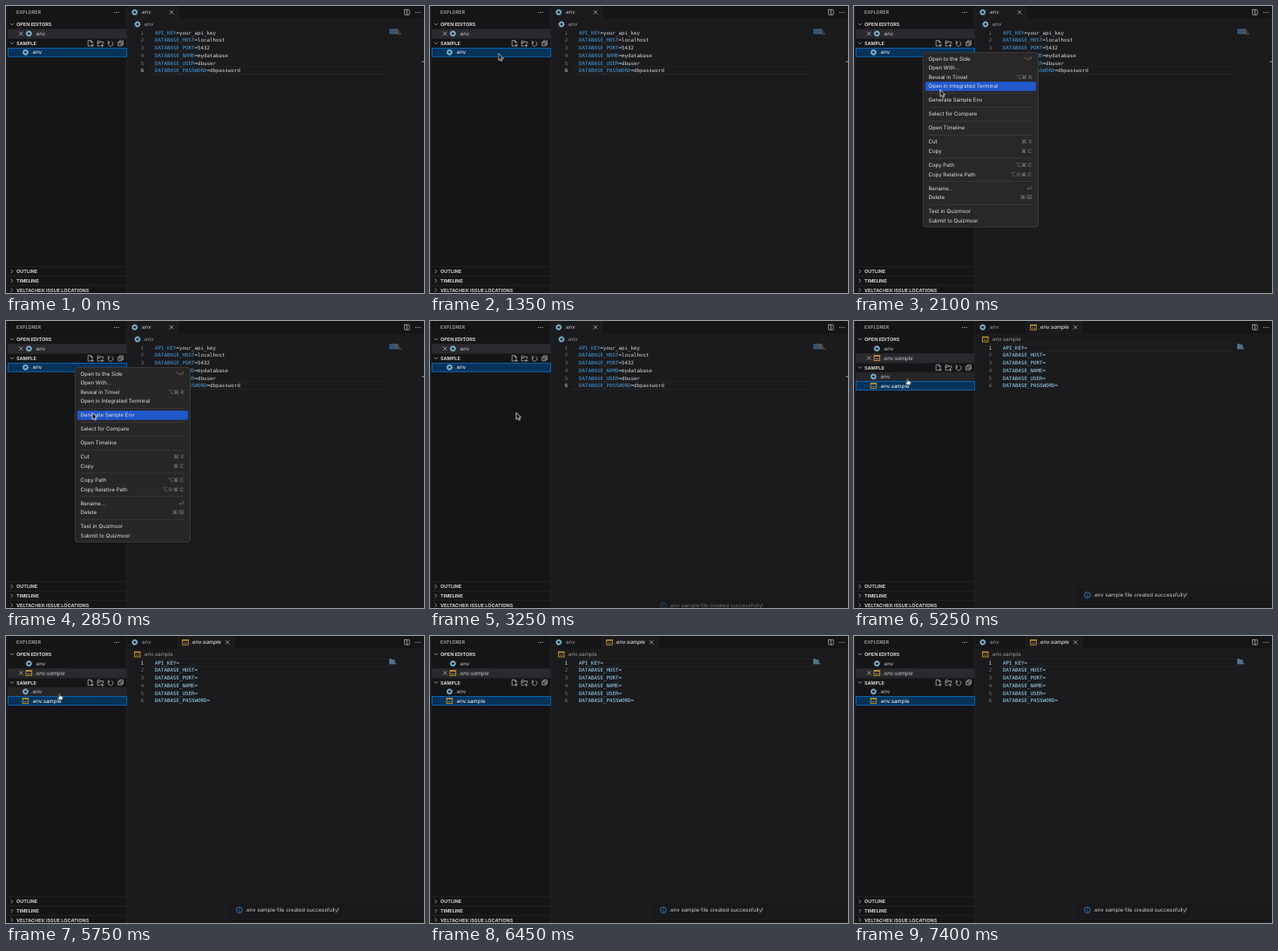
An HTML page that plays this animation: 480x330 px, repeating every 7450 ms.

```html
<!DOCTYPE html>
<html lang="en">
<head>
<meta charset="utf-8">
<title>Sample env generator</title>
<style>
html, body { margin: 0; width: 100%; height: 100%; overflow: hidden; background: #19191b; }
svg { display: block; width: 480px; height: 330px; }
text { font: 6.1px Inter, sans-serif; fill: #ccc; white-space: pre; text-rendering: geometricPrecision; }
.head { font-size: 5.5px; font-weight: 700; fill: #d0d0d0; }
.code, .code tspan { font: 5.82px "DejaVu Sans Mono", monospace; }
.num { fill: #6e7681; text-anchor: end; }
.on { fill: #d4d4d4; }
.key { fill: #459fe5; }
.val { fill: #d8dadd; }
.blank { fill: #9cdcfe; }
.dim { fill: #9b9b9b; }
.it { font-style: italic; }
.short { font-family: Inter, "DejaVu Sans", sans-serif; text-anchor: end; fill: #8b8989; }
.line { fill: none; stroke: #c4c4c4; stroke-width: .7; stroke-linecap: round; stroke-linejoin: round; }
.rule { stroke: #2a2a2c; stroke-width: .7; }

#before, #after, #newFile, #menu, #pick, #toast, #cursor, #arrow, #hand, .hover {
  animation: 7450ms step-end infinite;
}
#before { animation-name: before; }
#after, #hand { animation-name: after; }
#newFile { animation-name: newFile; }
#arrow { animation-name: arrow; }
#hand { animation-name: hand; }
#menu { animation-name: menu; }
#pick { animation-name: pick; }
#hoverNew { animation-name: hoverNew; }
#hoverEnv { animation-name: hoverEnv; }
#toast { animation-name: toast; animation-timing-function: linear; }
#cursor { animation-name: cursor; animation-timing-function: ease-in-out; }

@keyframes before { 0% { opacity: 1 } 66.44%, 100% { opacity: 0 } }
@keyframes after { 0% { opacity: 0 } 66.44%, 100% { opacity: 1 } }
@keyframes newFile { 0% { opacity: 0 } 49.66%, 100% { opacity: 1 } }
@keyframes hoverNew { 0% { opacity: 0 } 61.74% { opacity: 1 } 66.44%, 100% { opacity: 0 } }
@keyframes hoverEnv { 0% { opacity: 0 } 66.44% { opacity: 1 } 78.52%, 100% { opacity: 0 } }
@keyframes arrow { 0% { opacity: 1 } 62.42% { opacity: 0 } 78.52%, 100% { opacity: 1 } }
@keyframes hand { 0% { opacity: 0 } 62.42% { opacity: 1 } 78.52%, 100% { opacity: 0 } }
@keyframes menu {
  0% { opacity: 0 }
  19.46% { opacity: 1 }
  38.26% { opacity: 1; animation-timing-function: linear }
  39.6%, 100% { opacity: 0 }
}
@keyframes pick {
  0% { opacity: 0; transform: translateY(0) }
  23.49% { opacity: 1; transform: translateY(0) }
  25.5% { opacity: 1; transform: translateY(10.7px) }
  26.5% { opacity: 1; transform: translateY(21.3px) }
  27.4% { opacity: 1; transform: translateY(32px) }
  30.87% { opacity: 1; transform: translateY(48px) }
  36.91% { opacity: 0; transform: translateY(48px) }
  37.58%, 100% { opacity: 1; transform: translateY(48px) }
}
@keyframes toast {
  0%, 42.28% { opacity: 0; transform: translateY(24px); animation-timing-function: ease-out }
  46.31%, 100% { opacity: 1; transform: none }
}
@keyframes cursor {
  0%, 2.68% { transform: translate(-12px, 186px) }
  12.08%, 22.82% { transform: translate(78.5px, 54.5px) }
  28.19% { transform: translate(99px, 96.3px) }
  32.21%, 46.98% { transform: translate(99px, 105.2px) }
  57.72%, 59.06% { transform: translate(87.8px, 81.5px) }
  65.1%, 77.85% { transform: translate(61.5px, 66px) }
  84.56%, 100% { transform: translate(490px, 150px) }
}
</style>
</head>
<body>
<svg viewBox="0 0 480 330">
  <defs>
    <g id="gear" fill="none" stroke="#7db9d6">
      <circle r="2.2" stroke-width="1.5"/>
      <circle r="3.2" stroke-width="1" stroke-dasharray="1.25 1.263"/>
    </g>
    <g id="sheet" fill="none" stroke="#c8962e" stroke-width=".9">
      <rect x="-3.3" y="-2.8" width="6.6" height="5.8"/>
      <path d="M-3.3-2.3H3.3" stroke-width="1.3"/>
      <path d="M-1.9 1H2" stroke-dasharray="1 .5" stroke-width="1"/>
    </g>
    <path id="cross" class="line" d="M-1.9-1.9 1.9 1.9M1.9-1.9-1.9 1.9"/>
    <path id="down" class="line" d="M-1.8-.9 0 .9 1.8-.9"/>
    <path id="right" class="line" d="M-.9-1.8.9 0-.9 1.8"/>
    <g id="dots" fill="#c4c4c4"><circle cx="-2.3" r=".6"/><circle r=".6"/><circle cx="2.3" r=".6"/></g>
    <g id="tools" class="line">
      <path d="M96.5 46H94.2V39.7H97.5L99.3 41.5V42.8M97.4 39.8V41.6H99.2M98.9 43.8V47M97.3 45.4H100.5"/>
      <path d="M107.4 46H105.2V40.2H107.6L108.6 41.2H111.8V43.2M105.2 42.4H108L108.8 41.4M110.4 43.9V47.1M108.8 45.5H112"/>
      <path d="M118.2 41.1A2.9 2.9 0 1 0 121.6 40.8M117 40.2 118.5 41.2 118.1 42.9"/>
      <path d="M129 41.6H133V45.8H129ZM130.3 41.4V40H134.5V44.3H133.2M130 43.7H132"/>
    </g>
  </defs>

  <!-- shell -->
  <rect width="480" height="330" fill="#1b1b1d"/>
  <rect width="139" height="330" fill="#151517"/>
  <rect x="139" width="341" height="14.5" fill="#151517"/>
  <path class="rule" d="M1 0V330M138.8 0V330"/>
  <text x="12" y="9.3" style="font-size:5.5px">EXPLORER</text>
  <use href="#dots" x="127" y="7.3"/>
  <use href="#down" x="6.8" y="21"/>
  <text class="head" x="12" y="23">OPEN EDITORS</text>
  <g class="line"><rect x="457.6" y="4.3" width="5.6" height="5.8" rx=".5"/><path d="M460.4 4.3V10"/></g>
  <use href="#dots" x="473" y="7.3"/>
  <path class="rule" d="M2 299.8H138M2 310.6H138M2 321.2H138"/>
  <use href="#right" x="6.8" y="305.3"/>
  <use href="#right" x="6.8" y="316"/>
  <use href="#right" x="6.8" y="326.7"/>
  <text class="head" x="12" y="307.3">OUTLINE</text>
  <text class="head" x="12" y="318">TIMELINE</text>
  <text class="head" x="12" y="328.7">VELTACHEK ISSUE LOCATIONS</text>

  <g id="before">
    <rect x="139" width="58.6" height="15" fill="#1b1b1d"/>
    <path class="rule" d="M197.8 0V14.5M2 37.6H138"/>
    <use href="#gear" x="147.8" y="7.2"/>
    <text x="154.5" y="9.3">.env</text>
    <use href="#cross" x="190" y="7.2"/>
    <use href="#gear" x="151" y="21"/>
    <text class="dim" x="157.3" y="23.1">.env</text>

    <rect x="2" y="26.4" width="136.5" height="10.6" fill="#2a2a2e"/>
    <use href="#cross" x="17.2" y="31.7"/>
    <use href="#gear" x="26.3" y="31.7"/>
    <text x="33" y="33.8">.env</text>
    <use href="#down" x="6.8" y="42.8"/>
    <text class="head" x="12" y="45">SAMPLE</text>
    <use href="#tools"/>
    <rect x="2.3" y="48.4" width="136.1" height="9.9" fill="#04335a" stroke="#0874c8" stroke-width=".8"/>
    <use href="#gear" x="22.4" y="53.3"/>
    <text x="29" y="55.4" style="fill:#fff">.env</text>
    <g id="newFile">
      <rect id="hoverNew" class="hover" x="2" y="58.8" width="136.5" height="10.5" fill="#262629"/>
      <use href="#sheet" x="22.4" y="63.8"/>
      <text x="29" y="66">.env.sample</text>
    </g>
    <g id="filled"></g>
    <rect x="477.5" y="63.4" width="2.5" height="1.3" fill="#8a8a8a"/>
  </g>

  <g id="after">
    <rect x="198" width="63.6" height="15" fill="#1b1b1d"/>
    <path class="rule" d="M197.8 0V14.5M261.8 0V14.5M2 48.4H138"/>
    <use href="#gear" x="147.8" y="7.2"/>
    <text class="dim" x="154.5" y="9.3">.env</text>
    <use href="#sheet" x="206" y="7.2"/>
    <text class="it" x="212.3" y="9.3" style="fill:#fff">.env.sample</text>
    <use href="#cross" x="254.3" y="7.2"/>
    <use href="#sheet" x="150.8" y="21"/>
    <text class="dim" x="157.3" y="23.1">.env.sample</text>

    <use href="#gear" x="26.3" y="31.7"/>
    <text x="33" y="33.8">.env</text>
    <rect x="2" y="37.2" width="136.5" height="10.6" fill="#2a2a2e"/>
    <use href="#cross" x="17.2" y="42.5"/>
    <use href="#sheet" x="26.3" y="42.5"/>
    <text class="it" x="33" y="44.6">.env.sample</text>
    <use href="#down" x="6.8" y="53.5"/>
    <text class="head" x="12" y="55.7">SAMPLE</text>
    <use href="#tools" y="10.6"/>
    <rect id="hoverEnv" class="hover" x="2" y="58.8" width="136.5" height="10.3" fill="#262629"/>
    <use href="#gear" x="22.4" y="63.9"/>
    <text x="29" y="66">.env</text>
    <rect x="2.3" y="69.5" width="136.1" height="9.9" fill="#04335a" stroke="#0874c8" stroke-width=".8"/>
    <use href="#sheet" x="22.4" y="74.4"/>
    <text x="29" y="76.6" style="fill:#fff">.env.sample</text>
    <g id="emptied"></g>
  </g>

  <g id="toast">
    <rect x="257" y="303.5" width="224" height="24" rx="2" fill="#0c0c0d" opacity=".6"/>
    <rect x="258.6" y="304.6" width="223" height="21.3" rx="1.5" fill="#19191b" stroke="#29292b" stroke-width=".6"/>
    <circle cx="268" cy="315.1" r="3.4" fill="none" stroke="#3490e0" stroke-width=".8"/>
    <path d="M268 314.5V317M268 312.8V313.6" stroke="#3490e0" stroke-width=".8"/>
    <text x="274.5" y="317.3">.env sample file created successfully!</text>
  </g>

  <g id="menu">
    <rect x="78.5" y="53" width="133.6" height="202.3" rx="3.5" fill="#0a0a0a" opacity=".5"/>
    <rect x="79.2" y="53.4" width="132.3" height="200.8" rx="3" fill="#292727" stroke="#565555" stroke-width=".6"/>
    <rect id="pick" x="81.8" y="55.1" width="127.4" height="10.6" rx="2" fill="#2158cc"/>
    <g id="items"></g>
  </g>

  <g id="cursor">
    <path id="arrow" d="M0 0V8L1.8 6.4 3 9 4.4 8.4 3.2 5.8H5.6Z" fill="#111" stroke="#eee" stroke-width=".8" stroke-linejoin="round"/>
    <path id="hand" d="M-.7.6Q0-.4.7.6V2.8L3 3.2Q4 3.4 3.9 4.5L3.2 7.6H-.6L-2.5 4.8Q-2.3 3.7-.7 4.7Z" fill="#f2f2f2" stroke="#111" stroke-width=".6" stroke-linejoin="round"/>
  </g>
</svg>
<script>
const vars = [
  ["API_KEY", "your_api_key"], ["DATABASE_HOST", "localhost"], ["DATABASE_PORT", "5432"],
  ["DATABASE_NAME", "mydatabase"], ["DATABASE_USER", "dbuser"], ["DATABASE_PASSWORD", "dbpassword"]
];
const put = (id, html) => { document.getElementById(id).innerHTML = html; };
const bar = (x, y, chars, fill) =>
  `<rect x="${x}" y="${y}" width="${chars / 2}" height=".8" fill="${fill}" opacity=".65"/>`;

function editor(active, filled) {
  const top = 26.1 + active * 8.74;
  let out = `<path class="rule" d="M163 ${top}H436M163 ${top + 8.7}H436"/>`;
  vars.forEach(([key, value], i) => {
    const y = 32.6 + i * 8.74, mapY = 26.5 + i;
    out += `<text class="code num ${i === active ? "on" : ""}" x="158.3" y="${y}">${i + 1}</text>`;
    out += `<text class="code" x="171" y="${y}">` + (filled
      ? `<tspan class="key">${key}</tspan><tspan class="val">=${value}</tspan>`
      : `<tspan class="blank">${key}=</tspan>`) + "</text>";
    out += bar(440, mapY, key.length, filled ? "#459fe5" : "#9cdcfe");
    if (filled) out += bar(440 + key.length / 2, mapY, value.length + 1, "#aaa");
  });
  return out;
}
put("filled", editor(5, true));
put("emptied", editor(0, false));

// Each inner list is one section of the context menu.
const sections = [
  [["Open to the Side", "^⏎"], ["Open With..."], ["Reveal in Tinvel", "⌥⌘ R"], ["Open in Integrated Terminal"]],
  [["Generate Sample Env"]],
  [["Select for Compare"]],
  [["Open Timeline"]],
  [["Cut", "⌘ X"], ["Copy", "⌘ C"]],
  [["Copy Path", "⌥⌘ C"], ["Copy Relative Path", "⌥⇧⌘ C"]],
  [["Rename...", "⏎"], ["Delete", "⌘⌫"]],
  [["Test in Quizmoor"], ["Submit to Quizmoor"]]
];
let y = 60.4, items = "";
sections.forEach((section, i) => {
  if (i) {
    items += `<path d="M85.5 ${y - 2.6}H205" stroke="#484646" stroke-width=".6"/>`;
    y += 5.35;
  }
  for (const [label, keys] of section) {
    items += `<text x="85.5" y="${y + 2.1}" style="fill:#e4e2e2">${label}</text>`;
    if (keys) items += `<text class="short" x="204.3" y="${y + 2.1}">${keys}</text>`;
    y += 10.64;
  }
});
put("items", items);
</script>
</body>
</html>
```
